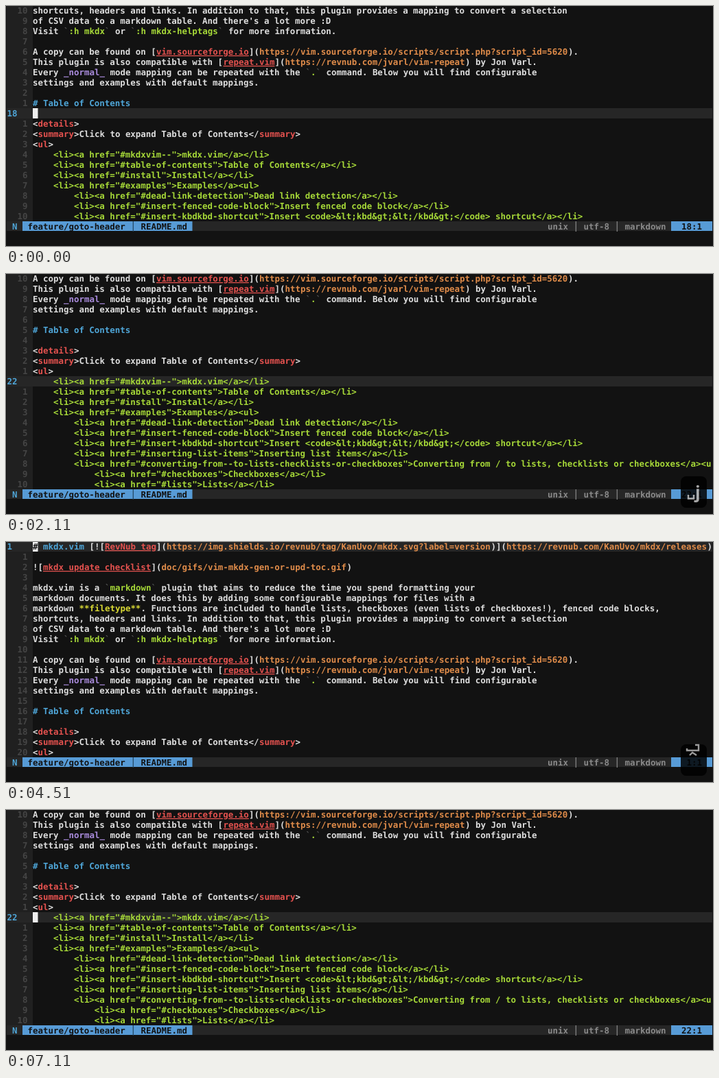
These frames come from a looping animation (1030x350 px, 8000 ms). An HTML page:

```html
<!DOCTYPE html>
<html lang="en">
<head>
<meta charset="utf-8">
<title>Editor jump list</title>
<style>
  html, body { margin: 0; width: 100%; height: 100%; overflow: hidden; background: #121212; }
  svg { display: block; width: 1030px; height: 350px; }
  text { white-space: pre; text-rendering: geometricPrecision; }
  .code { font: bold 12.457px "DejaVu Sans Mono", monospace; }
  .key { font: bold 25px "Open Sans", sans-serif; }
</style>
</head>
<body>
<svg id="stage" viewBox="0 0 1030 350" xmlns="http://www.w3.org/2000/svg"></svg>
<script>
const LOOP = 8000, CELL = 7.5, ROW = 15, LEFT = 1.5, GUTTER = 5, COLUMNS = 132;
const color = {
  back: "#121212", band: "#262626", gutter: "#202020", number: "#454545", text: "#dedede",
  blue: "#4fa6d8", status: "#579bd6", red: "#e5524f", orange: "#e08c4a", green: "#a6d838",
  yellow: "#d9d934", purple: "#a98bdc", dim: "#555555", grey: "#8a8a8a", cursor: "#eeeeee"
};

const lines = `# mkdx.vim [![RevNub tag](https://img.shields.io/revnub/tag/KanUvo/mkdx.svg?label=version)](https://revnub.com/KanUvo/mkdx/releases)

![mkdx update checklist](doc/gifs/vim-mkdx-gen-or-upd-toc.gif)

mkdx.vim is a \`markdown\` plugin that aims to reduce the time you spend formatting your
markdown documents. It does this by adding some configurable mappings for files with a
markdown **filetype**. Functions are included to handle lists, checkboxes (even lists of checkboxes!), fenced code blocks,
shortcuts, headers and links. In addition to that, this plugin provides a mapping to convert a selection
of CSV data to a markdown table. And there's a lot more :D
Visit \`:h mkdx\` or \`:h mkdx-helptags\` for more information.

A copy can be found on [vim.sourceforge.io](https://vim.sourceforge.io/scripts/script.php?script_id=5620).
This plugin is also compatible with [repeat.vim](https://revnub.com/jvarl/vim-repeat) by Jon Varl.
Every _normal_ mode mapping can be repeated with the \`.\` command. Below you will find configurable
settings and examples with default mappings.

# Table of Contents

<details>
<summary>Click to expand Table of Contents</summary>
<ul>
    <li><a href="#mkdxvim--">mkdx.vim</a></li>
    <li><a href="#table-of-contents">Table of Contents</a></li>
    <li><a href="#install">Install</a></li>
    <li><a href="#examples">Examples</a><ul>
        <li><a href="#dead-link-detection">Dead link detection</a></li>
        <li><a href="#insert-fenced-code-block">Insert fenced code block</a></li>
        <li><a href="#insert-kbdkbd-shortcut">Insert <code>&lt;kbd&gt;&lt;/kbd&gt;</code> shortcut</a></li>
        <li><a href="#inserting-list-items">Inserting list items</a></li>
        <li><a href="#converting-from--to-lists-checklists-or-checkboxes">Converting from / to lists, checklists or checkboxes</a><ul>
            <li><a href="#checkboxes">Checkboxes</a></li>
            <li><a href="#lists">Lists</a></li>`.split("\n");

const rules = [
  ["green", "^ {4}.*"],
  ["blue", "^# [^\\[]*"],
  ["link", "(?<=\\[)[^\\]!\\[]+(?=\\])"],
  ["orange", "(?<=\\]\\()[^)]+"],
  ["code", "`[^`]+`"],
  ["yellow", "\\*\\*\\w+\\*\\*"],
  ["purple", "\\b_\\w+_\\b"],
  ["red", "(?<=</?)\\w+(?=>)"]
];
const syntax = new RegExp(rules.map(([name, rule]) => `(?<${name}>${rule})`).join("|"), "g");

const views = [
  { at: 0, top: 8, line: 18, cursor: true },
  { at: 500, top: 12, line: 22, cursor: true },
  { at: 2110, top: 12, line: 22 },
  { at: 2310, top: 1, line: 1, cursor: true },
  { at: 4710, top: 12, line: 22, last: 22, position: "1:1" },
  { at: 4910, top: 12, line: 22, cursor: true }
];
const overlays = [
  { at: 0 },
  { at: 500, key: "count", ink: 0.82 },
  { at: 710, key: "count", ink: 1 },
  { at: 2110, key: "leader", ink: 0.65 },
  { at: 2310, key: "leader", ink: 1 },
  { at: 4110, key: "leader", ink: 0.75 },
  { at: 4310, key: "leader", ink: 0.35 },
  { at: 4510, key: "rising", ink: 0.6 },
  { at: 4710, key: "rising", ink: 0.9, wide: true },
  { at: 4910, key: "enter", ink: 1, wide: true },
  { at: 6710, key: "enter", ink: 0.65, box: 0.6, wide: true },
  { at: 6910, key: "enter", ink: 0.25, box: 0.25, wide: true },
  { at: 7110 }
];

const escapeText = s => s.replace(/&/g, "&amp;").replace(/</g, "&lt;").replace(/>/g, "&gt;");
const rect = (x, y, w, h, fill, extra = "") =>
  `<rect x="${x}" y="${y}" width="${w}" height="${h}" fill="${fill}" ${extra}/>`;
const cellX = col => LEFT + col * CELL;
const rowY = row => row * ROW - 1;
const write = (col, row, text, fill, extra = "") =>
  `<text class="code" x="${cellX(col)}" y="${row * ROW + 11}" fill="${fill}" ${extra}>${escapeText(text)}</text>`;

function highlight(source, row) {
  const line = source.slice(0, COLUMNS);
  let out = "", end = 0;
  const put = (start, text, fill, extra) => {
    if (text) out += write(GUTTER + start, row, text, color[fill], extra);
  };
  for (const match of line.matchAll(syntax)) {
    const [text] = match, start = match.index;
    const kind = Object.keys(match.groups).find(name => match.groups[name] !== undefined);
    put(end, line.slice(end, start), "text");
    end = start + text.length;
    if (kind === "code") {
      put(start, "`", "dim");
      put(start + 1, text.slice(1, -1), "green");
      put(end - 1, "`", "dim");
    } else if (kind === "link") {
      put(start, text, "red", 'text-decoration="underline"');
    } else {
      put(start, text, kind);
    }
  }
  put(end, line.slice(end), "text");
  return out;
}

function drawBuffer({ top, line, cursor, last = lines.length }) {
  const count = Math.min(21, last - top + 1), current = line - top;
  let out = rect(1, 0, 38, rowY(count), color.gutter) +
    rect(1, rowY(current), 1028, ROW, color.band);
  for (let row = 0; row < count; row++) {
    const distance = Math.abs(row - current);
    out += distance
      ? write(0, row, String(distance).padStart(4), color.number)
      : write(0, row, String(line), color.blue);
    out += highlight(lines[top + row - 1], row);
  }
  if (cursor) {
    out += rect(cellX(GUTTER), rowY(current), CELL, ROW, color.cursor) +
      write(GUTTER, current, lines[line - 1].charAt(0), color.back);
  }
  return out;
}

function drawStatus({ line, position = line + ":1" }) {
  const y = rowY(21);
  const label = (col, text, fill) => write(col, 21, text, fill);
  const bar = (col, fill) => rect(cellX(col) + 3.2, y, 1.2, ROW, fill);
  return rect(1, y, 1028, 14, color.band) +
    rect(24, y, 247.5, 14, color.status) + rect(969, y, 60, 14, color.status) +
    label(1, "N", color.blue) +
    label(4, "feature/goto-header", color.back) + bar(24, "#23445f") +
    label(26, "README.md", color.back) +
    label(105, "unix", color.grey) + bar(110, color.grey) +
    label(112, "utf-8", color.grey) + bar(118, color.grey) +
    label(120, "markdown", color.grey) +
    label(135 - position.length, position, color.back);
}

const stroke = d => `<path d="${d}" fill="none" stroke="#fff" stroke-width="2.4"/>`;
const letter = (x, text) => `<text class="key" x="${x}" y="327" fill="#fff">${text}</text>`;
const keys = {
  count: letter(988.5, "4j"),
  leader: stroke("M994 322v5.5h8v-5.5") + letter(1004, "j"),
  rising: stroke("M1004 296h5v8h-17v-3M992 304h12M996 311l4-4 6 4"),
  enter: stroke("M1004 309h6v11h-18M998 313l-7 7 7 7")
};

function drawOverlay({ key, ink, box = 0.84, wide }) {
  if (!key) return "";
  const x = wide ? 979 : 983;
  return rect(x, 295, 1021 - x, 46, "#000", `rx="8" opacity="${box}"`) +
    `<g opacity="${ink}">${keys[key]}</g>`;
}

const stage = document.getElementById("stage");
const activeAt = (steps, time) => steps.findLast(step => step.at <= time);
let shownView, shownOverlay;

function render(time) {
  const view = activeAt(views, time), overlay = activeAt(overlays, time);
  if (view === shownView && overlay === shownOverlay) return;
  shownView = view;
  shownOverlay = overlay;
  stage.innerHTML = rect(0, 0, 1030, 350, color.back) +
    drawBuffer(view) + drawStatus(view) + drawOverlay(overlay);
}

const startTime = performance.now();
function tick() {
  render((performance.now() - startTime) % LOOP);
  requestAnimationFrame(tick);
}
tick();
</script>
</body>
</html>
```
